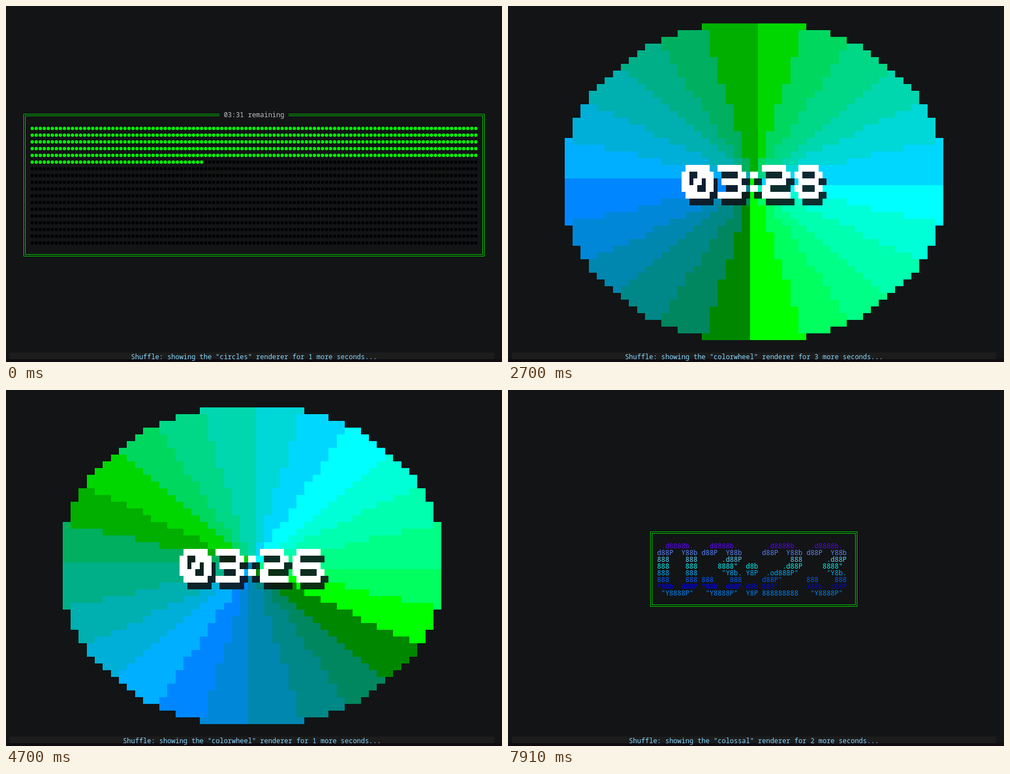
An HTML page with a canvas for the animation above (8 s loop, 883 px wide and 634 px high).

```html
<!DOCTYPE html>
<html lang="en">
<head>
<meta charset="utf-8">
<title>Terminal countdown</title>
<style>
  html, body { margin: 0; width: 100%; height: 100%; overflow: hidden; background: #121415; }
  canvas { display: block; }
</style>
</head>
<body>
<canvas id="term" width="883" height="634"></canvas>
<script>
const ctx = document.getElementById('term').getContext('2d');
const W = 883, H = 634, CW = W / 123, CH = 12, TOP = 7;
const LOOP = 8000, TICK = 100;
const BG = '#121415', GREEN = '#00cd00';
const FONT = `${CW / 0.6}px "Noto Sans Mono", "DejaVu Sans Mono", monospace`;

const LEVELS = ['00', '5f', '87', 'af', 'd7', 'ff'];
const DOWN = [...LEVELS].reverse();
const WHEEL = [['d7', LEVELS], ['ff', DOWN], ['87', LEVELS], ['af', DOWN]]
  .flatMap(([g, blues]) => blues.map(b => `#00${g}${b}`));
const BLUES = [...LEVELS.map(g => `#00${g}ff`), ...DOWN.map(g => `#5f${g}ff`)];
const LINE_CYCLE = [...BLUES, ...[...BLUES].reverse()];

// Block digits, five rows each
const BLOCK = {
  '0': '.XXXXXX./XX..XXXX/XX.XX.XX/XXXX..XX/.XXXXXX.',
  '2': 'XXXXXX./.....XX/.XXXXX./XX...../XXXXXXX',
  '3': 'XXXXXX./.....XX/.XXXXX./.....XX/XXXXXX.',
  '5': 'XXXXXXX/XX...../XXXXXX./.....XX/XXXXXX.',
  '6': '.XXXXXX./XX....../XXXXXXX./XX....XX/.XXXXXX.',
  '7': 'XXXXXXX/.....XX/....XX./...XX../..XX...',
  '8': '.XXXXX./XX...XX/.XXXXX./XX...XX/.XXXXX.',
  '9': '.XXXXX./XX...XX/.XXXXXX/.....XX/XXXXXX.',
  ':': '../XX/../XX/..'
};

// Large text digits, eight lines each
const BOWL = [' .d8888b.', 'd88P  Y88b'], BASE = ['Y88b  d88P', ' "Y8888P"'];
const STEM = '888    888';
const BIG = {
  '0': [...BOWL, STEM, STEM, STEM, STEM, ...BASE],
  '2': [...BOWL, '       888', '     .d88P', ' .od888P"', 'd88P"', '888"', '888888888'],
  '3': [...BOWL, '     .d88P', '    8888"', '     "Y8b.', STEM, ...BASE],
  '4': ['    d8888', '   d8P888', '  d8P 888', ' d8P  888', 'd88   888', '8888888888',
        '      888', '      888'],
  '5': ['888888888', '888', '888', '8888888b.', '     "Y88b', '       888', ...BASE],
  ':': ['', '', '', 'd8b', 'Y8P', '', 'd8b', 'Y8P']
};

const px = col => Math.round(col * CW);
const py = row => TOP + row * CH;
const mod = (n, m) => ((n % m) + m) % m;

function cells(col, row, n, color) {
  ctx.fillStyle = color;
  ctx.fillRect(px(col), py(row), px(col + n) - px(col), CH);
}

// Every character sits in its own terminal cell
function text(str, col, baseline, color) {
  ctx.fillStyle = color;
  [...str].forEach((ch, i) => {
    if (ch !== ' ') ctx.fillText(ch, (col + i) * CW, baseline);
  });
}

function doubleBox(x, y, w, h) {
  ctx.strokeStyle = GREEN;
  ctx.lineWidth = 1;
  ctx.strokeRect(x + .5, y + .5, w - 1, h - 1);
  ctx.strokeRect(x + 3.5, y + 3.5, w - 7, h - 7);
}

function clock(tick) {
  const left = 211 - Math.floor((tick + 8) / 10);
  const two = n => String(n).padStart(2, '0');
  return two(Math.floor(left / 60)) + ':' + two(left % 60);
}

function circles(tick) {
  doubleBox(31, 192, 821, 254);
  ctx.fillStyle = BG;
  ctx.fillRect(px(53), 190, px(70) - px(53), 8);
  text(clock(tick) + ' remaining', 54, 198, '#c4c4c4');
  const done = 5 * 111 + 43 + Math.floor((2 * tick + 1) / 3);
  for (let i = 0; i < 18 * 111; i++) {
    ctx.fillStyle = i < done ? '#00ff00' : '#000';
    ctx.beginPath();
    ctx.arc((6.5 + i % 111) * CW, 218 + Math.floor(i / 111) * CH, 2.9, 0, 7);
    ctx.fill();
  }
}

function blockText(str, col, row) {
  const on = [];
  for (const ch of str) {
    const rows = BLOCK[ch].split('/');
    rows.forEach((line, r) => [...line].forEach((c, i) => {
      if (c === 'X') on.push([col + i, row + r]);
    }));
    col += rows[0].length + 1;
  }
  const lit = new Set(on.map(String));
  for (const [c, r] of on) {
    if (!lit.has(`${c + 1},${r + 1}`)) cells(c + 1, r + 1, 1, 'rgba(14,16,20,.87)');
  }
  for (const [c, r] of on) cells(c, r, 1, '#fff');
}

function colorwheel(tick) {
  for (let dy = -23; dy <= 23; dy++) {
    for (let dx = -23; dx <= 23; dx++) {
      if (dx * dx + dy * dy >= 576) continue;
      const turn = Math.atan2(dx, -dy) * 12 / Math.PI;
      const sector = Math.ceil(turn - 1e-9) - 1;
      cells(60 + 2 * dx, 25 + dy, 2, WHEEL[mod(sector + 27 - tick, 24)]);
    }
  }
  // a shadow cell of one digit is always covered by a later white cell
  blockText3(clock(tick));
}

function blockText3(str) {
  blockText(str, 43, 23);
}

function colossal(tick) {
  doubleBox(253, 252, 369, 134);
  let col = 37;
  for (const ch of clock(tick)) {
    BIG[ch].forEach((line, i) =>
      text(line, col, 282 + i * CH, LINE_CYCLE[mod(tick - 43 + 2 * i, 24)]));
    col += ch === ':' ? 4 : 11;
  }
}

function clipped(view, tick, x0, x1) {
  ctx.save();
  ctx.beginPath();
  ctx.rect(x0, 0, x1 - x0, H);
  ctx.clip();
  view(tick);
  ctx.restore();
}

// A dark bar crosses the screen, uncovering the next view behind it
function wipe(from, to, tick, col) {
  clipped(to, tick, 0, px(col));
  clipped(from, tick, px(col + 1), W);
  ctx.fillStyle = '#1c1026';
  ctx.fillRect(px(col), TOP, px(col + 1) - px(col), 610);
}

function status(tick) {
  const sec = Math.floor(tick / 10);
  const name = ['circles', 'colorwheel', 'colossal'][sec < 1 ? 0 : sec < 5 ? 1 : 2];
  const left = sec < 1 ? 1 : sec < 5 ? 5 - sec : 9 - sec;
  const msg = left > 3
    ? `Shuffle: loading the "${name}" renderer...`
    : `Shuffle: showing the "${name}" renderer for ${left} more seconds...`;
  ctx.fillStyle = '#1c1c1c';
  ctx.fillRect(px(1), 617, px(121) - px(1), 12);
  ctx.fillStyle = '#100c11';
  ctx.fillRect(0, 629, W, 5);
  text(msg, 1 + Math.ceil((120 - msg.length) / 2), 628.5, '#87d7ff');
}

function draw(tick) {
  ctx.fillStyle = BG;
  ctx.fillRect(0, 0, W, H);
  ctx.font = FONT;
  if (tick < 15) circles(tick);
  else if (tick < 20) wipe(circles, colorwheel, tick, 12 + 24 * (tick - 15));
  else if (tick < 55) colorwheel(tick);
  else if (tick < 60) wipe(colorwheel, colossal, tick, 11 + 24 * (tick - 55));
  else colossal(tick);
  status(tick);
}

const start = performance.now();
let shown = -1;
function frame() {
  const tick = Math.floor((performance.now() - start) % LOOP / TICK);
  if (tick !== shown) draw(shown = tick);
  requestAnimationFrame(frame);
}
frame();
</script>
</body>
</html>
```
